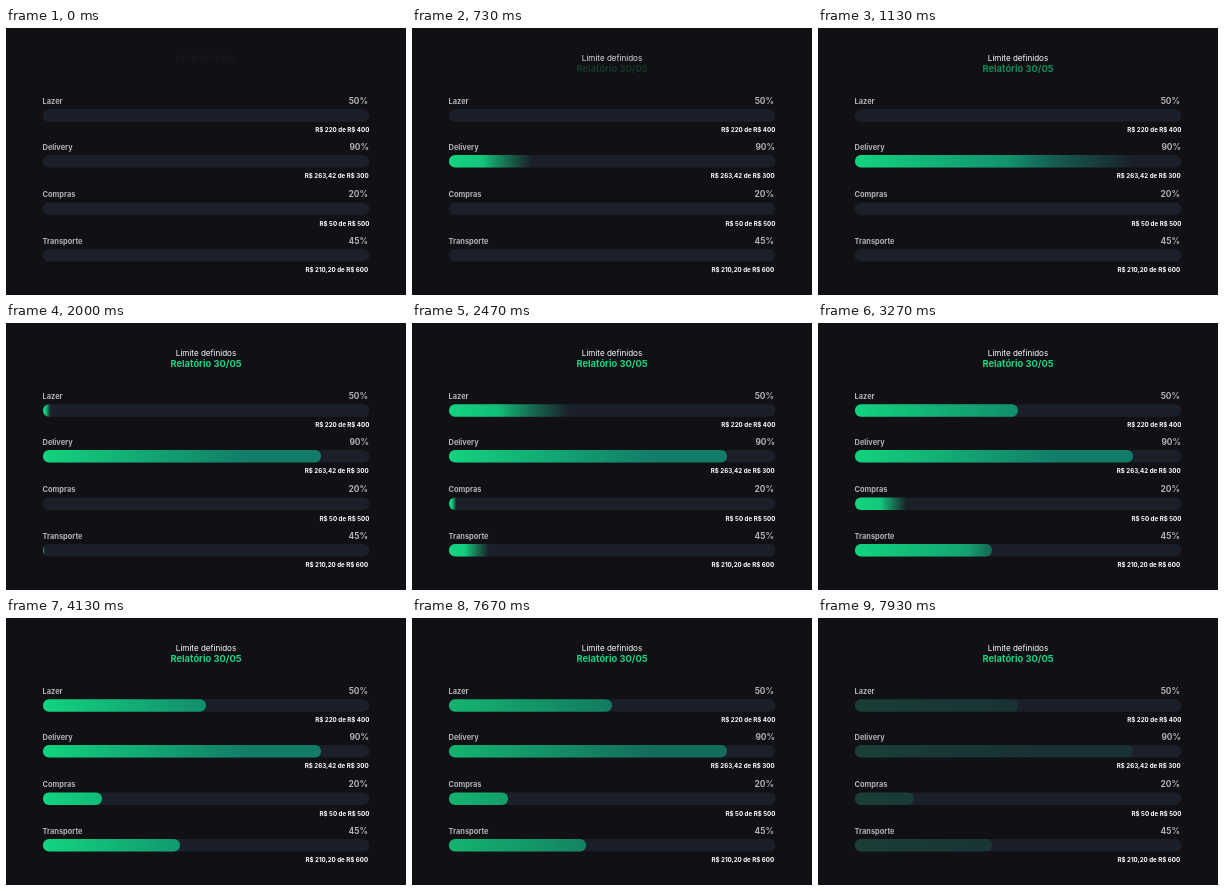
An HTML page with a canvas for the animation above (8000 ms loop, 400 by 267 pixels).

```html
<!DOCTYPE html>
<html lang="pt">
<head>
<meta charset="utf-8">
<title>Limite definidos</title>
<style>
  html, body { margin: 0; width: 100%; height: 100%; overflow: hidden; background: #111014; }
  canvas { display: block; width: 400px; height: 267px; }
</style>
</head>
<body>
<canvas id="stage"></canvas>
<script>
const W = 400, H = 267, LOOP = 8000;
const LEFT = 37, RIGHT = 363, BAR_H = 12.5, RADIUS = 6;
const GREEN = [18, 212, 126], TEAL = [18, 124, 104], SHADE_END = 240;
const FEATHER = 0.45;

// y: bar top, end: right edge of the fill, from/to: wipe times in ms
const rows = [
  { label: 'Lazer', pct: '50%', sum: 'R$ 220 de R$ 400', y: 81.2, end: 200, from: 1880, to: 3040,
    base: 76.2, pctX: 362, pctY: 76.1, sumX: 363.4, sumY: 104.3 },
  { label: 'Delivery', pct: '90%', sum: 'R$ 263,42 de R$ 300', y: 126.9, end: 315, from: 390, to: 1560,
    base: 121.7, pctX: 363, pctY: 122.4, sumX: 362.6, sumY: 150.3 },
  { label: 'Compras', pct: '20%', sum: 'R$ 50 de R$ 500', y: 174.5, end: 96, from: 2100, to: 4150,
    base: 169.1, pctX: 362, pctY: 169.1, sumX: 363.4, sumY: 197.7 },
  { label: 'Transporte', pct: '45%', sum: 'R$ 210,20 de R$ 600', y: 221, end: 174, from: 2000, to: 3640,
    base: 215.7, pctX: 362, pctY: 215.5, sumX: 362.2, sumY: 243.7 }
];

const canvas = document.getElementById('stage');
const ctx = canvas.getContext('2d');
const dpr = window.devicePixelRatio || 1;
canvas.width = Math.round(W * dpr);
canvas.height = Math.round(H * dpr);

const clamp = v => Math.min(1, Math.max(0, v));
const ramp = (t, a, b) => clamp((t - a) / (b - a));
const smooth = p => p * p * (3 - 2 * p);

function text(str, x, y, size, weight, color, align = 'left') {
  ctx.font = `${weight} ${size}px Inter, sans-serif`;
  ctx.textAlign = align;
  ctx.fillStyle = color;
  ctx.fillText(str, x, y);
}

function pill(x1, x2, y, fill) {
  ctx.fillStyle = fill;
  ctx.beginPath();
  ctx.roundRect(x1, y, x2 - x1, BAR_H, RADIUS);
  ctx.fill();
}

function shade(x, alpha) {
  const k = clamp((x - LEFT) / (SHADE_END - LEFT));
  const rgb = GREEN.map((c, i) => Math.round(c + (TEAL[i] - c) * k));
  return `rgba(${rgb.join(',')},${alpha.toFixed(3)})`;
}

// Green fill revealed from the left behind a soft edge
function drawFill(row, t) {
  const lead = smooth(ramp(t, row.from, row.to)) * (1 + FEATHER);
  if (lead <= 0) return;
  const soft = Math.min(FEATHER, lead * 0.6);
  const grad = ctx.createLinearGradient(LEFT, 0, row.end, 0);
  const steps = 80;
  for (let i = 0; i <= steps; i++) {
    const u = i / steps;
    grad.addColorStop(u, shade(LEFT + u * (row.end - LEFT), clamp((lead - u) / soft)));
  }
  ctx.globalAlpha = 1 - ramp(t, 7600, 8000);
  pill(LEFT, row.end, row.y, grad);
  ctx.globalAlpha = 1;
}

function draw(t) {
  ctx.setTransform(dpr, 0, 0, dpr, 0, 0);
  ctx.fillStyle = '#111014';
  ctx.fillRect(0, 0, W, H);

  ctx.globalAlpha = ramp(t, -45, 850);
  text('Limite definidos', 200, 33, 8.05, 400, '#fff', 'center');
  ctx.globalAlpha = ramp(t, 530, 1500);
  text('Relatório 30/05', 200, 44.3, 9.35, 700, '#16d682', 'center');
  ctx.globalAlpha = 1;

  for (const row of rows) {
    text(row.label, LEFT - 0.4, row.base, 7.4, 700, '#b1b1b3');
    text(row.pct, row.pctX, row.pctY, 8.4, 700, '#b1b1b3', 'right');
    text(row.sum, row.sumX, row.sumY, 6.2, 700, '#fff', 'right');
    pill(LEFT - 0.3, RIGHT + 0.3, row.y, '#1a1f29');
    drawFill(row, t);
  }
}

const start = performance.now();
function tick() {
  draw((performance.now() - start) % LOOP);
  requestAnimationFrame(tick);
}
tick();
</script>
</body>
</html>
```
